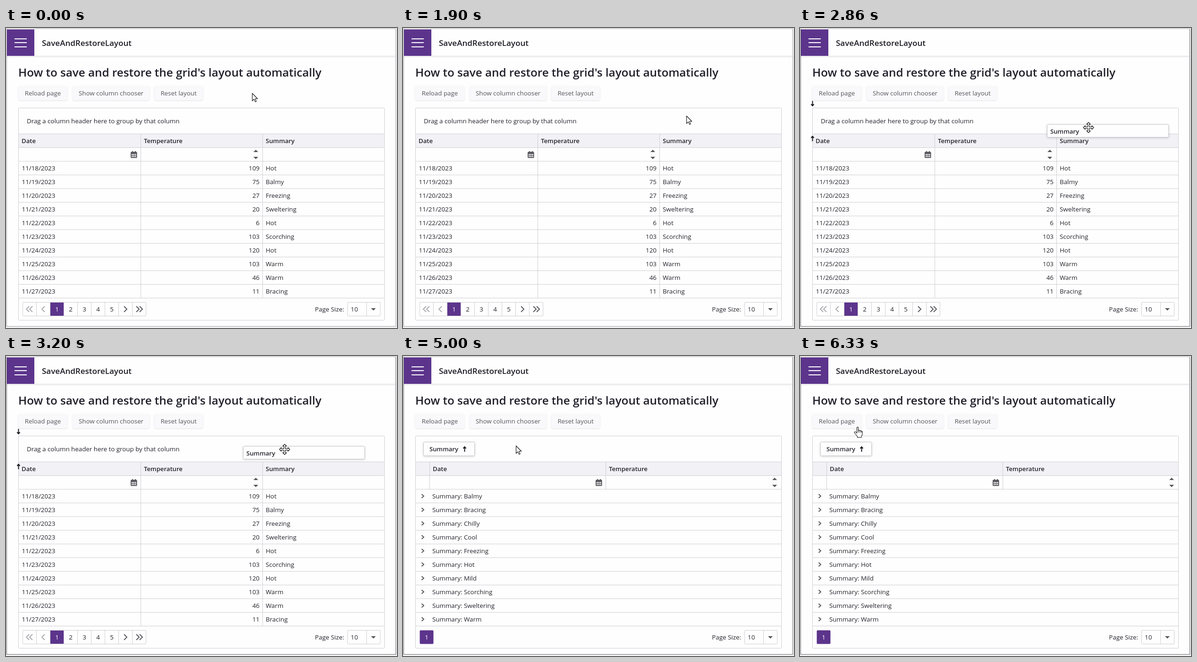
Recreate the animation shown at these times as an HTML page. Size 828 px wide and 636 px high, loop 8.7 s.

```html
<!DOCTYPE html>
<html lang="en">
<head>
<meta charset="utf-8">
<title>Grid layout</title>
<style>
  html, body { margin: 0; width: 100%; height: 100%; overflow: hidden; background: #f1f1f3; }
  svg { display: block; width: 828px; height: 636px; }
  text { font: 13.35px "Open Sans", "Noto Sans", sans-serif; fill: #24242c; white-space: pre; }
  .bold { font-weight: 600; font-size: 13.15px; }
  .title { font-weight: 600; font-size: 17.05px; fill: #1c1c24; }
  .h1 { font-weight: 600; font-size: 24.2px; fill: #1f1f29; }
  .button { fill: #55555d; }
  .white { fill: #fff; }
  .middle { text-anchor: middle; }
  .end { text-anchor: end; }
  .line { stroke: #d0d0d4; fill: none; shape-rendering: crispEdges; }
  .chip { stroke: #cbcbd0; fill: #fefefe; filter: drop-shadow(0 1px 2px #0003); }
  .soft { fill: #f9f9fc; filter: drop-shadow(0 1px 1.5px #0000001c); }
  .chevron { fill: none; stroke: #55555b; stroke-width: 1.8; }
  .dim { stroke: #a9a9ae; }
  .icon { fill: #55555b; }
  .pointer { fill: #fff; stroke: #111; stroke-width: 1.1; stroke-linejoin: round; }
</style>
</head>
<body>
<svg id="stage" viewBox="0 0 828 636"></svg>
<script>
const PURPLE = '#5c348c', LOOP = 8700;
const text = (x, y, s, cls = '') => `<text x="${x}" y="${y}" class="${cls}">${s}</text>`;
const rect = (x, y, w, h, attrs) => `<rect x="${x}" y="${y}" width="${w}" height="${h}" ${attrs}/>`;
const path = (d, cls, attrs = '') => `<path d="${d}" class="${cls}" ${attrs}/>`;
const group = (id, body) => `<g id="${id}">${body}</g>`;
const rows = (list, draw) => list.map((item, i) => draw(item, 302 + 29 * i, i)).join('');
const upArrow = (x, y) => path(`M${x} ${y}v11M${x - 3} ${y + 4}l3-3.5 3 3.5`, '', 'fill="none" stroke="#1c1c24" stroke-width="2"');

const button = (x, w, label, id) =>
  rect(x, 123, w, 30, `rx="3" class="soft" id="${id}"`) + text(x + w / 2, 143, label, 'button middle');

const calendar = x => `<g transform="translate(${x} 261)">` +
  path('M2 1.5h1V0h2v1.5h4V0h2v1.5h1q1.5 0 1.5 1.5v10q0 1.5-1.5 1.5h-10.500q-1.500 0-1.500-1.500v-10q0-1.500 1.500-1.500z', 'icon') +
  [0, 1, 2].map(c => [0, 1].map(r => rect(2 + c * 3.5, 6 + r * 3.8, 2.4, 2.6, 'fill="#fefefe"')).join('')).join('') + '</g>';

const spinner = x => path(`M${x - 5} 263l5-5 5 5zM${x - 5} 273l5 5 5-5z`, 'icon');

const flatPager = rect(35.5, 581.5, 261, 29, 'rx="2" class="line"') +
  path([64, 93, 122, 151, 180, 209, 238, 267].map(x => `M${x + .5} 582v28`).join(''), 'line') +
  rect(94, 582, 28, 28, `fill="${PURPLE}"`) +
  [1, 2, 3, 4, 5].map((n, i) => text(108 + 29 * i, 601, n, i ? 'middle' : 'middle white')).join('') +
  path('M49 590l-6 6 6 6M56 590l-6 6 6 6M82 590l-6 6 6 6', 'chevron dim') +
  path('M250 590l6 6-6 6M276 590l6 6-6 6M283 590l6 6-6 6', 'chevron');

const flatRows = (temps, words) => rows(words.split(' '), (word, y, i) =>
  text(33.5, y, `11/${18 + i}/2023`) + text(537, y, temps[i], 'end') + text(550, y, word));

const flat = text(44, 202, 'Drag a column header here to group by that column') +
  path('M285.500 225V572M543.500 225V572', 'line') +
  text(33, 244, 'Date', 'bold') + text(292, 244, 'Temperature', 'bold') + text(550, 244, 'Summary', 'bold') +
  calendar(264) + spinner(529) + flatPager +
  group('before', flatRows([109, 75, 27, 20, 6, 103, 120, 103, 46, 11],
    'Hot Balmy Freezing Sweltering Hot Scorching Hot Warm Warm Bracing')) +
  group('after', flatRows([102, 120, 69, 64, 67, 96, 85, 116, 109, 103],
    'Bracing Warm Hot Freezing Balmy Hot Bracing Balmy Mild Mild'));

const grouped = rect(43.5, 182.5, 108, 29, 'rx="2" class="chip"') +
  text(56, 202, 'Summary', 'bold') + upArrow(130.5, 192) +
  path('M56.500 225V282M429.500 225V282', 'line') +
  text(63, 244, 'Date', 'bold') + text(436, 244, 'Temperature', 'bold') +
  calendar(408) + spinner(787) +
  rows('Balmy Bracing Chilly Cool Freezing Hot Mild Scorching Sweltering Warm'.split(' '), (word, y) =>
    path(`M39.500 ${y - 9}l4.500 4-4.500 4`, 'chevron') + text(62, y, 'Summary: ' + word)) +
  rect(35.5, 581.5, 29, 29, `rx="2" fill="${PURPLE}"`) + text(50, 601, 1, 'middle white');

const gridLines = Array.from({ length: 12 }, (_, i) => `M27 ${253.5 + 29 * i}H801`).join('');

document.getElementById('stage').innerHTML =
  rect(1, 1, 825, 632, 'fill="#fefefe"') +
  rect(2, 59, 823, 1, 'fill="#e4e4e6"') + rect(2, 60, 823, 1, 'fill="#ececee"') + rect(2, 61, 823, 2, 'fill="#f6f6f8"') +
  rect(2, 3, 58, 56, `fill="${PURPLE}"`) +
  [22, 30, 39].map(y => rect(18, y, 26, 2, 'fill="#fff"')).join('') +
  text(76, 38, 'SaveAndRestoreLayout', 'title') +
  rect(1.5, 1.5, 824, 631, 'id="frame" fill="none" shape-rendering="crispEdges"') +
  path('M1 1.500H826', '', 'stroke="#b4b4b8" shape-rendering="crispEdges"') +
  group('page',
    text(26, 103, "How to save and restore the grid's layout automatically", 'h1') +
    button(26, 104, 'Reload page', 'reload') +
    button(141, 163, 'Show column chooser', 'chooser') +
    button(314, 103, 'Reset layout', 'reset') +
    rect(27, 225, 774, 28, 'fill="#f2f1f5"') +
    rect(26.5, 169.5, 775, 450, 'rx="2" class="line"') +
    path('M27 224.500H801' + gridLines, 'line') +
    group('flat', flat) + group('grouped', grouped) +
    text(716, 601, 'Page Size:', 'end') +
    rect(723.5, 581.5, 69, 29, 'rx="2" class="line"') + path('M763.500 582v28', 'line') +
    path('M773 594h10l-5 5z', 'icon') + group('size', text(730, 601, 10))) +
  group('marks', upArrow(26.5, 229) + `<g transform="rotate(180 26.5 160)">${upArrow(26.5, 154.5)}</g>`) +
  group('ghost', rect(-87.5, -6.5, 257, 27, 'rx="2" class="chip"') + text(-81, 13, 'Summary', 'bold')) +
  group('arrow', path('M.5.5v16l3.700-3.600 2.500 5.700 2.400-1-2.400-5.600h5z', 'pointer')) +
  group('hand', path('M-1.500 1.500q1.500-2 3 0v6.500q2.500-1.500 3.500.5q2.500-1 3 1q2-.5 2 1.500v4q0 3-2 5v2.500h-8.500v-2l-6-7.500q-1-2 1-2.500q1.500 0 4 3zM1.500 8v4M5 8.500v4M8 9.500v3', 'pointer')) +
  group('move', path('M0-11l4 4h-2.500v5.500h5.500v-2.500l4 4-4 4v-2.500h-5.500v5.500h2.500l-4 4-4-4h2.500v-5.500h-5.500v2.500l-4-4 4-4v2.500h5.500v-5.500h-2.500z', 'pointer'));

const $ = id => document.getElementById(id);
const show = (id, on) => $(id).style.display = on ? '' : 'none';
const place = (id, [x, y]) => $(id).setAttribute('transform', `translate(${x} ${y})`);

// start, end, and the points of a quadratic curve
const moves = [
  [1300, 2200, [521, 138], [590, 150], [630, 233]],
  [2230, 2230, [633, 231], [633, 231], [633, 231]],
  [2500, 3200, [633, 231], [612, 208], [590, 198]],
  [4270, 5160, [590, 198], [385, 240], [159, 168]],
  [5170, 5500, [159, 168], [136, 158], [122, 150]],
];

function pointerAt(t) {
  const [start, end, a, b, c] = moves.findLast(m => t >= m[0]) || moves[0];
  const u = end > start ? Math.min(1, Math.max(0, (t - start) / (end - start))) : 1;
  return a.map((v, i) => Math.round(v * (1 - u) ** 2 + 2 * b[i] * u * (1 - u) + c[i] * u * u));
}

function render(t) {
  const pos = pointerAt(t);
  const reloading = t >= 6130 && t < 6330;
  const isGrouped = t >= 3330 && !reloading;
  const dragging = t >= 2560 && t < 3330;
  const hand = t >= 2230 && t < 2560 || t >= 5400;

  show('page', t < 6230 || t >= 6280);
  show('flat', !isGrouped);
  show('grouped', isGrouped);
  show('before', t < 3330);
  show('after', reloading);
  show('size', !reloading);
  show('ghost', dragging);
  show('marks', dragging && pos[1] < 224);
  show('move', dragging);
  show('hand', hand);
  show('arrow', !hand && !dragging);
  for (const id of ['ghost', 'move', 'hand', 'arrow']) place(id, pos);
  $('frame').setAttribute('stroke', t < 2500 ? '#a8a8ac' : '#6c6c70');
  $('reload').style.fill = t >= 5400 && t < 6130 ? '#f5f5f9' : '';
}

function tick() {
  render(performance.now() % LOOP);
  requestAnimationFrame(tick);
}
tick();
</script>
</body>
</html>
```
